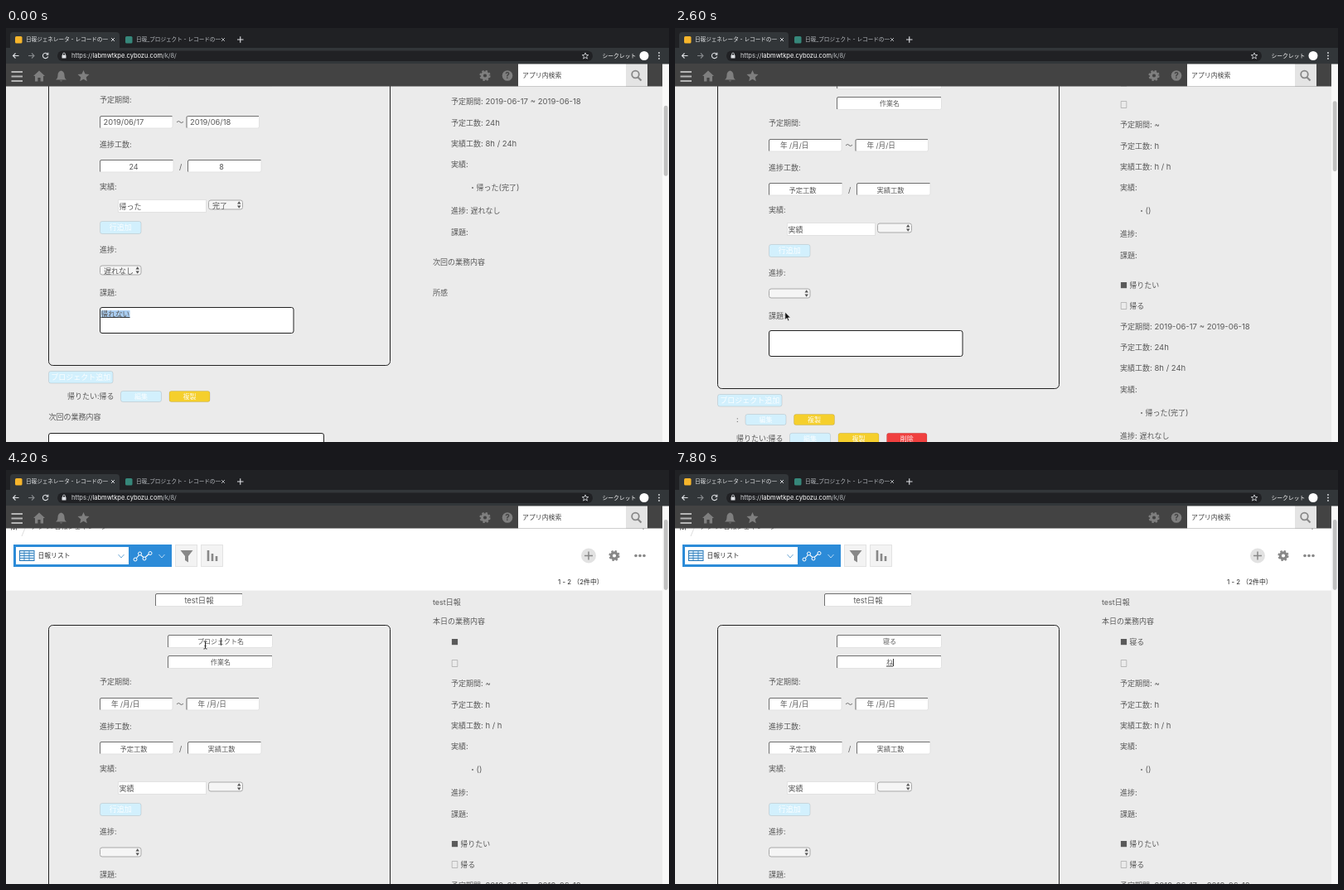
These frames come from a looping animation (800 px wide and 500 px high, 8 s). An HTML page:

```html
<!DOCTYPE html>
<html lang="ja">
<head>
<meta charset="utf-8">
<style>
html, body { margin: 0; width: 100%; height: 100%; overflow: hidden; background: #ebebeb; }
svg { display: block; font-family: Inter, "Noto Sans CJK JP", "Noto Sans CJK", sans-serif; }
.cjk { font-family: "Noto Sans CJK JP", "Noto Sans CJK", sans-serif; }
.latin { font-size: 1.06em; }
</style>
</head>
<body>
<svg width="800" height="500" viewBox="0 0 800 500"><g id="page"></g><g id="chrome"></g></svg>
<script>
const MID = 'text-anchor="middle"';
const BOLD = 'font-weight="700"';

// y is the vertical centre of the line
const text = (x, y, s, size = 9, fill = '#5a5a5a', extra = '') =>
  `<text x="${x}" y="${y + size * .37}" font-size="${size}" fill="${fill}" ${/[■□]/.test(s) ? 'class="cjk"' : ''} ${extra}>${s}</text>`;
const latin = s => s.replace(/[\x20-\x7e]+/g, '<tspan class="latin">$&</tspan>');
const rect = (x, y, w, h, fill, r = 0, extra = '') =>
  `<rect x="${x}" y="${y}" width="${w}" height="${h}" rx="${r}" fill="${fill}" ${extra}/>`;
const path = (d, stroke, width = 1, fill = 'none') =>
  `<path d="${d}" stroke="${stroke}" stroke-width="${width}" fill="${fill}"/>`;
const circle = (x, y, r, fill, extra = '') => `<circle cx="${x}" cy="${y}" r="${r}" fill="${fill}" ${extra}/>`;
const at = (x, y, s) => `<g transform="translate(${x} ${y})">${s}</g>`;

const gear = (x, y, color) =>
  circle(x, y, 3.7, 'none', `stroke="${color}" stroke-width="3.2"`) +
  circle(x, y, 5.7, 'none', `stroke="${color}" stroke-width="1.8" stroke-dasharray="2.4 2.08"`);
const cross = (x, y, r, color) => path(`M${x - r} ${y - r}l${2 * r} ${2 * r}m0 ${-2 * r}l${-2 * r} ${2 * r}`, color, .9);
const chevron = (x, y, color) => path(`M${x - 3.5} ${y - 2}l3.5 4 3.5-4`, color, 1);

const input = (x, y, w, h = 15.5) =>
  rect(x + .5, y + .5, w - 1, h - 1, '#fff', 2, 'stroke="#e2e2e2"') +
  path(`M${x + .5} ${y + h - 1}V${y + 2}q0-1.5 1.5-1.5H${x + w - 1}`, '#707070');
const select = (x, y, w, label = '') =>
  rect(x + .5, y + .5, w - 1, 11, '#f5f5f5', 2.5, 'stroke="#a9a9a9"') +
  path(`M${x + w - 7} ${y + 5}l2.2-3.2 2.2 3.2zm0 2l2.2 3.2 2.2-3.2z`, 'none', 0, '#555') +
  text(x + 5, y + 7, label);
const button = (x, y, w, label, fill = '#d2f0fd', h = 14) =>
  rect(x + .5, y + .5, w - 1, h - 1, fill, 2.5, 'stroke="#000" stroke-opacity=".1"') +
  text(x + w / 2, y + h / 2, label, h > 14.5 ? 9 : 8, '#fff', MID + ' font-weight="500" fill-opacity=".9"');
const area = (x, y, w, h) => rect(x + .5, y + .5, w, h, '#fff', 2.5, 'stroke="#222"');

function chromeView() {
  const icon = '#7f7f7f', pale = '#dfe1e5';
  return rect(0, 0, 800, 27, '#202124') + rect(5, 5, 132, 30, '#323639', 4) + rect(0, 24, 800, 19.5, '#323639') +
    rect(11, 10, 8.5, 8.5, '#f6b52b', 1.5) + rect(144, 10, 8.5, 8.5, '#36877a', 1.5) +
    text(24, 14, '日報ジェネレータ - レコードの一', 6.6, '#e4e6e8') + text(157, 14, '日報_プロジェクト - レコードの一', 6.6, '#b8bcc0') +
    cross(129, 14, 2, pale) + cross(262, 14, 2, '#b8bcc0') + path('M279 14h7.5m-3.75-3.75v7.5', pale, 1.1) +
    path('M15.5 33.5h-7m3-3l-3 3 3 3', pale, 1.1) + path('M27 33.5h7m-3-3l3 3-3 3', '#85888b', 1.1) +
    path('M50 31.3a3.2 3.2 0 1 0 .7 3M50.8 29.8v2.4h-2.4', pale, 1.1) +
    rect(62, 27.5, 646, 12.5, '#202124', 6.2) +
    rect(67.5, 32.5, 5, 4, pale, .6) + path('M68.5 33v-1.4a1.5 1.5 0 0 1 3 0v1.4', pale, .8) +
    text(79, 33.5, '<tspan fill="#d8dadc">https://</tspan>labmwtkpe.cybozu.com<tspan fill="#b2b6ba">/k/8/</tspan>', 7.5, '#fff') +
    path('M699 29.9l1 2.6 2.8.1-2.2 1.8.8 2.7-2.4-1.6-2.4 1.6.8-2.7-2.2-1.8 2.8-.1z', pale, .8) +
    text(719.5, 33.5, 'シークレット', 6.8, '#fff') + circle(770, 33.5, 5.5, '#fff') +
    [30, 33.5, 37].map(y => circle(788, y, .9, pale)).join('') +
    rect(0, 43, 792, 27.5, '#434343') +
    path('M6.5 53h13.5M6.5 58.5h13.5M6.5 64h13.5', '#b5b5b5', 1.8) +
    path('M40 51.5l7 6.5h-2v6.5h-3.4v-4.5h-3.2v4.5H35v-6.5h-2z', 'none', 0, icon) +
    path('M66.5 51.5q4 1 4 5.5 0 4 2.5 5.5H60q2.5-1.5 2.5-5.5 0-4.5 4-5.5zM65 63.5h3q-1.5 2-3 0z', 'none', 0, icon) +
    path('M93.5 51l2 4.6 5 .5-3.8 3.3 1.1 4.9-4.3-2.6-4.3 2.6 1.1-4.9-3.8-3.3 5-.5z', 'none', 0, icon) +
    gear(578, 57.5, icon) + circle(605, 57.5, 6.3, icon) + text(605, 57.5, '?', 10, '#434343', MID + ' ' + BOLD) +
    rect(618, 43.5, 130, 27, '#fff') + rect(748, 43.5, 26, 27, '#e4e4e4') + text(623, 57, 'アプリ内検索', 7.9, '#444') +
    circle(759.5, 56, 4.3, 'none', 'stroke="#888" stroke-width="1.8"') + path('M762.5 59.5l4 4', '#888', 2.2);
}

function bandView() {
  const rows = [100.5, 103.5, 106.5].map(y => `M16.5 ${y}h17`).join('');
  return rect(0, 40, 792, 105.5, '#fff') +
    path('M6.5 72.5v-4h2v3h2v-3h2v4', '#666', 1) + path('M19 80l5-12', '#ddd') +
    text(30, 68.5, 'アプリ: 日報ジェネレータ', 8, '#555') + circle(769, 71, 1, '#aaa') +
    rect(9, 90, 191, 27, '#2c8bd8') + rect(12, 93, 136, 21, '#fff') +
    rect(16.5, 97.5, 17.5, 12, '#d6eafa', 0, 'stroke="#2879b8"') + path(rows + 'M22 98v11m6-11v11', '#2879b8', .8) +
    text(38.5, 103.5, '日報リスト', 7.8, '#333') + chevron(139, 104, '#6fa9d6') +
    path('M156.5 107.5l5-6 5.5 5 6-5.5', '#fff', 1.1) +
    [[156, 108], [161.5, 101], [167, 107], [174, 100.5]].map(([x, y]) => circle(x, y, 2, '#2c8bd8', 'stroke="#fff"')).join('') +
    chevron(188, 104, '#b5d8f3') +
    rect(204.5, 90.5, 26, 26, '#f3f3f3', 0, 'stroke="#e3e3e3"') + rect(235.5, 90.5, 26, 26, '#f3f3f3', 0, 'stroke="#e3e3e3"') +
    path('M210.5 97h15l-5.5 7v7.5l-4-2.5v-5z', 'none', 0, '#888') +
    path('M244 97v13m5-9v9m5-6v6', '#888', 2.6) +
    circle(703, 103.5, 9, '#e2e2e2') + path('M698 103.5h10m-5-5v10', '#888', 1.5) + gear(734, 103.5, '#888') +
    [760, 765, 770].map(x => circle(x, 103.5, 1.8, '#888')).join('') +
    text(666, 135.5, '1 - 2 （2件中）', 7.9, '#222');
}

const oldProject = {
  name: '帰りたい', task: '帰る', from: '2019-06-17', to: '2019-06-18',
  plan: '24', done: '8', result: '帰った', status: '完了', progress: '遅れなし'
};
const blank = Object.fromEntries(Object.keys(oldProject).map(key => [key, '']));

// Text field contents around a centre, with optional underline and caret
function entry(x, y, value, hint, { composing, caret }) {
  const half = [...value].reduce((w, c) => w + (c < '~' ? 5 : 8), 0) / 2;
  return text(x, y, value || hint, 8, '#5a5a5a', MID) +
    (composing ? path(`M${x - half} ${y + 4.5}h${2 * half}`, '#222', .9) : '') +
    (caret ? path(`M${x + half + .5} ${y - 4.5}v9`, '#222', .9) : '');
}

function formView(p, s) {
  const slash = d => d.replaceAll('-', '/');
  const date = (x, d) => input(x, 275, 88.5) +
    (d ? text(x + 4.5, 283, slash(d), 9.4) : text(x + 14, 283, '年 /月/日', 8.6));
  const rows = s.added ? [s.project, oldProject] : [oldProject];
  const shift = s.added ? 23 : 0;
  return input(180, 149, 106, 16) + text(233, 157.5, 'test日報', 9.4, '#5a5a5a', MID) +
    rect(51.5, 187.5, 412, 389, 'none', 5, 'stroke="#222"') +
    input(195, 199, 127, 16) + entry(259, 207.5, p.name, 'プロジェクト名', s.nameEdit) +
    input(195, 224, 127, 16) + entry(259, 232.5, p.task, '作業名', s.taskEdit) +
    text(113, 256, '予定期間:') + date(113, p.from) + text(205.5, 283, '〜') + date(217.5, p.to) +
    text(113, 309.5, '進捗工数:') + input(113, 328, 89.5) + input(219, 328, 89.5) + text(209, 336.5, '/') +
    text(154, 336.5, p.plan || '予定工数', p.plan ? 9 : 8.3, '#5a5a5a', MID) +
    text(260, 336.5, p.done || '実績工数', p.done ? 9 : 8.3, '#5a5a5a', MID) +
    text(113, 360.5, '実績:') + rect(135.5, 376.5, 106, 15, '#fff', 0, 'stroke="#e2e2e2"') +
    text(136.5, 384.5, p.result || '実績') + select(244, 376.5, 42, p.status) +
    button(113, 402, 50.5, '行追加', undefined, 16) +
    text(113, 437, '進捗:') + select(113, 455.5, 50.5, p.progress) +
    text(113, 488.5, '課題:') + area(113, 506, 233.5, 31) +
    (s.selecting ? rect(114.5, 510, 35, 9, '#a9cdf1') + path('M114.5 518.5h35', '#222', .9) : '') +
    text(114.5, 514.5, s.added ? '' : '帰れない', 8.7) +
    button(51, 583, 78.5, 'プロジェクト追加', undefined, 15.5) +
    rows.map((r, i) => {
      const y = 607 + i * 22.8, x = r.name ? 138 : 84.5;
      return text(74, y + 7, `${r.name}:${r.task}`) + button(x, y, 50, '編集') + button(x + 58.5, y, 50, '複製', '#f5cf2c') +
        (i ? button(x + 117, y, 49.5, '削除', '#f0403f') : '');
    }).join('') +
    text(51.5, 639 + shift, '次回の業務内容') + area(51, 658 + shift, 332, 60);
}

function reportView(s) {
  let y = 208, out = text(515, 160, 'test日報') + text(515, 182.5, '本日の業務内容');
  for (const p of s.added ? [s.project, oldProject] : [oldProject]) {
    const issue = p === oldProject && !s.selecting;
    const lines = [[0, `■ ${p.name}`], [25.3, `□ ${p.task}`], [50, `予定期間: ${p.from} ~ ${p.to}`],
      [75.3, `予定工数: ${p.plan}h`], [100.5, `実績工数: ${p.done}h / ${p.plan}h`], [125.7, '実績:'],
      [154, `・${p.result}(${p.status})`, 21.5], [182, `進捗: ${p.progress}`], [207.3, '課題:']];
    out += lines.map(([d, label, indent = 0]) => text(537 + indent, y + d, latin(label))).join('');
    if (issue) out += text(537, y + 232.3, '帰れない', 8.7, '#505050', 'font-weight="500"');
    y += issue ? 257.3 : 243.5;
  }
  return out + text(515, y, '次回の業務内容') + text(515, y + 37.5, '所感');
}

const pointers = {
  arrow: path('M0-4v9.5l2.2-2 1.5 3.4 1.5-.7-1.5-3.3h3z', '#fff', .7, '#111'),
  hand: path('M-1.8-4.6q0-1 .9-1t.9 1V-1.5l3.2.6q1.3.3 1.1 1.6L3.7 5h-5L-4.4 1q-.2-1.2 1.1-.7l1.500.9z', '#111', .9, '#fff'),
  beam: path('M-2-4.5q1.5 0 2 .8.5-.8 2-.8M0-3.7v7.4M-2 4.5q1.5 0 2-.8.5.8 2 .8M-1 1h2', '#222', 1)
};

// Linear interpolation through [time, ...values]
function track(keys, t) {
  const i = keys.findIndex(k => k[0] > t);
  if (i < 0) return keys.at(-1).slice(1);
  if (!i) return keys[0].slice(1);
  const a = keys[i - 1], b = keys[i], f = (t - a[0]) / (b[0] - a[0]);
  return a.slice(1).map((v, j) => v + (b[j + 1] - v) * f);
}
const latest = (keys, t) => keys.reduce((v, [start, value]) => t >= start ? value : v, '');

const scrollKeys = [[2400, -169], [2600, -141], [2800, -97], [3000, -36], [3200, 0]];
const mouseKeys = [[1000, 150, 352], [1600, 90, 420], [2000, 90, 420], [2400, 132, 345.5], [2800, 133.5, 348.5],
  [3200, 133.5, 300], [3400, 133.5, 300], [4200, 240.5, 211.5]];
const nameKeys = [[4800, 'n'], [5000, 'ね'], [5200, 'ねr'], [5400, 'ねる'], [5800, '寝る']];
const taskKeys = [[7400, 'n'], [7800, 'ね']];
const pointerKeys = [[1000, 'arrow'], [1600, 'hand'], [2200, 'arrow'], [2400, 'beam'], [2600, 'arrow'], [4200, 'beam'], [4600, '']];

function pageView(t) {
  const [dy] = track(scrollKeys, t), [mx, my] = track(mouseKeys, t);
  const state = {
    added: t >= 1800,
    selecting: t < 200,
    project: { ...blank, name: t >= 6200 ? '寝る' : '' },
    nameEdit: { composing: t >= 4800 && t < 6200, caret: t >= 4200 && t < 6800 },
    taskEdit: { composing: t >= 7400, caret: t >= 6800 }
  };
  const form = state.added ? { ...blank, name: latest(nameKeys, t), task: latest(taskKeys, t) } : oldProject;
  return rect(0, 43, 800, 457, '#ebebeb') + at(0, dy, bandView() + formView(form, state) + reportView(state)) +
    rect(792, 43, 8, 457, '#f8f8f8') + rect(793.8, 60 - dy * .2, 4.8, 85, '#c1c1c1', 2.4) +
    at(mx, my, pointers[latest(pointerKeys, t)] || '');
}

const page = document.getElementById('page');
document.getElementById('chrome').innerHTML = chromeView();
let start, shown = -1;
function frame(now) {
  start ??= now;
  const t = Math.floor((now - start) % 8000 / 200) * 200;
  if (t !== shown) page.innerHTML = pageView(shown = t);
  requestAnimationFrame(frame);
}
requestAnimationFrame(frame);
</script>
</body>
</html>
```
